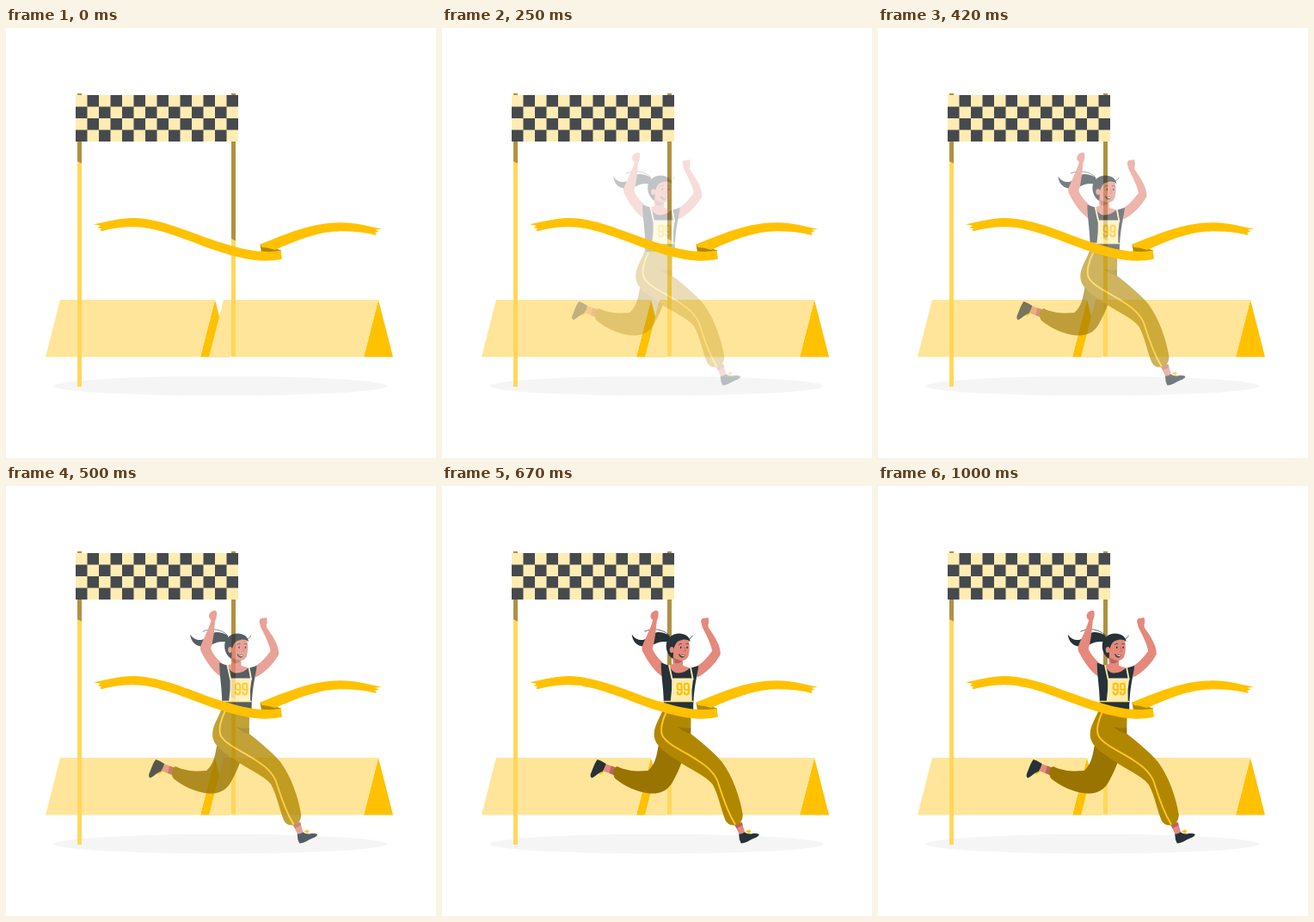
Animation of 500x500 px, one loop 1.04 s. Source, as an HTML page:

```html
<!DOCTYPE html>
<html lang="en">
<head>
<meta charset="utf-8">
<title>Finish line</title>
<style>
  html, body { margin: 0; width: 100%; height: 100%; overflow: hidden; background: #fff; }
  svg { display: block; width: 100%; height: 100%; }
  .gold { fill: #ffc100; }
  .pale { fill: #ffe599; }
  .cream { fill: #ffecb3; }
  .pole { fill: #ffd75c; }
  .poleShade { fill: #b09140; }
  .check { fill: #464a4f; }
  .ink { fill: #263238; }
  .skin { fill: #e4897b; }
  .skinShade { fill: #b8665c; }
  .pants { fill: #b28700; }
  .pantsBack { fill: #997400; }
  .line { fill: none; stroke-linecap: round; stroke-linejoin: round; }
</style>
</head>
<body>
<svg viewBox="0 0 500 500">
  <ellipse cx="249.5" cy="416.2" rx="193.9" ry="11.3" fill="#f5f5f5"/>

  <!-- barriers -->
  <path class="gold" d="M243 316L260 382.5H226Z"/>
  <path class="pale" d="M63 316H243L226 382.5H46Z"/>
  <path class="gold" d="M433 316L450 382.5H416Z"/>
  <path class="pale" d="M253 316H433L416 382.5H236Z"/>

  <!-- gate -->
  <path class="pole" d="M83 76H88V417H83ZM262 76H267V382H262Z"/>
  <path class="poleShade" d="M83 76H88V157.5L83 155ZM262 76H267V247.5L262 245Z"/>
  <rect class="cream" x="81" y="78" width="189" height="54"/>
  <path class="check" id="checks"/>

  <g id="runner" opacity="0">
    <!-- ponytail -->
    <path class="ink" d="M265 174C254 167 245 170 240 176C234 181 226 180 221 172.500C222 182 228 187 238 187C247 186 250 179 265 181.500Z"/>
    <path class="line" stroke="#263238" stroke-width=".7" d="M236 169C246 165 256 166 264 173"/>

    <!-- back leg -->
    <path class="skin" d="M190 323L203 327.500L200 336L187 331Z"/>
    <path class="skinShade" d="M197 325.500L203 327.500L200 336L195 334Z"/>
    <path class="gold" d="M183 333L189 330L188 333L184 335.500Z"/>
    <path class="ink" d="M181 318Q185 319 191 323Q189 329 187 332C182 333 179 338 174.500 339.500Q172 338 173.500 334C176 329 177 323 181 318Z"/>
    <path class="pantsBack" d="M204 326C216 332 229 332 240 331C249 323 250 312 252 302L284 304C281 318 275 333 268 345C261 356 252 358 242 357.500C228 356 212 349 202 340.500C198 336 199 328 204 326Z"/>

    <!-- front leg -->
    <path class="skin" d="M340 393L349 391L352.500 403L346 405Z"/>
    <path class="skinShade" d="M340 393L349 391L350 394.500L343 398Z"/>
    <path class="gold" d="M353 402L357 399.500L359.500 401L358 404Z"/>
    <path class="ink" d="M345.500 404.500Q349 405 352 402.500Q356 405.500 362 404Q367 403.500 369 405C369 408 363 409.500 359 411.500C355 414 351 415.500 348 415.500Q345.500 411 345.500 404.500Z"/>
    <path class="pants" d="M258 258H290L289.500 288C301 297 316 309 326 321C338 337 347 362 350 382C350 390 346 394 341 394.500Q333 395 330 389C325 377 322 360 315 347C306 336 289 330 274 319C261 311 248 302 247 291C246 279 254 270 258 258Z"/>
    <path class="pantsBack" d="M274 280Q284 283 289.500 281V288.500Q281 286 274 280Z"/>
    <path class="line" stroke="#ffc727" stroke-width="1.9" d="M261.500 262C257 271 253 284 257 291C264 302 283 309 299 320C310 327 319 335 322 347C327 363 333 380 341 393"/>

    <!-- arms -->
    <path class="skin" d="M245.500 156C242 168 236 178 233 187Q232 191 235 195C240 205 248 216 257 222L260 208C253 202 247 195 245 189C248 180 249 168 250 157C252 153 252.500 148 251.500 145.500Q249 143.500 245 146.500Q241.500 150 243.500 154Z"/>
    <path class="skin" d="M303 164C307 172 313 183 314.500 192C309 199 303 206 296 210L297 222.500C307 218 318 207 324 196C325 187 317 174 310 164.500Q309 161 310.500 159L310 153L303 154Q300.500 156 302 160Z"/>

    <!-- torso -->
    <path class="skin" d="M268 196L280 199L280.500 209L290 212L280 220H270L262 209L269 207Z"/>
    <path class="ink" d="M255 205.500L265 209Q268 218 275 217.500Q283 217 288 212L298.500 209C297 223 293 232 292.500 260H258C259 240 255 222 255 205.500Z"/>
    <path class="line" stroke="#ffecb3" stroke-width="1.8" d="M264.500 209L268 225M289.500 211.500L292 225" stroke-linecap="butt"/>
    <path class="cream" d="M267.500 223.500H292.500Q290 237 291 250.500H266Q268 237 267.500 223.500Z"/>
    <path class="line" stroke="#ffdc75" stroke-width="1.3" d="M258 250.500H292"/>
    <g class="line" stroke="#ffc100" stroke-width="2.2">
      <path id="nine" d="M279 237H276Q274 237 274 234.500V232Q274 229.700 276.500 229.700Q279 229.700 279 232V239.500Q279 242.300 276.500 242.300Q274 242.300 274 239.700"/>
      <use href="#nine" x="8.2"/>
    </g>

    <!-- head -->
    <path class="skinShade" d="M269.500 200L280 202.500Q278 207 271 206Z"/>
    <path class="skin" d="M266 182C268 175 283 173 287 179C288.500 184 288.500 191 287 197C285.500 202 281 204 276 202.500C271 201 268 197 267 193Z"/>
    <path class="ink" d="M261 186C261 177 268 171.500 276 171.500C283 171.500 288 175 289 181C285 177.500 281 178 276 180C272 182 271 186 269.500 190L269 201C264 198 261 192 261 186Z"/>
    <path class="line" stroke="#263238" stroke-width=".7" d="M286 178Q290 178 291.500 174"/>
    <ellipse class="skin" cx="267.500" cy="190.500" rx="2.500" ry="3.500"/>
    <ellipse class="ink" cx="278" cy="187.700" rx=".8" ry="1.200"/>
    <ellipse class="ink" cx="285.400" cy="187.700" rx=".8" ry="1.200"/>
    <path class="line" stroke="#263238" stroke-width=".7" d="M275.500 184.500Q277 182.500 279 183.500M284 183.500Q286 182.500 287 184"/>
    <path class="line" stroke="#b8665c" stroke-width=".7" d="M282 187L283.500 192L281.500 192.500"/>
    <path class="ink" d="M275.500 195Q279 197.500 283 196.500Q282 200 279 199.500Q276 198.500 275.500 195Z"/>
    <path fill="#fff" d="M276.500 195.700Q279 197.500 282.300 196.800L281.800 197.900Q278 198.200 276.500 195.700Z"/>
  </g>

  <!-- ribbon -->
  <path fill="#b28700" d="M295.500 251.500L320 258.500L318 262L297 261Z"/>
  <path class="gold" d="M102 228.300C119 225 131 221 148 221C185 221.500 224 243 260 252.500C279 258 299 262.500 319.500 258.500L321 268.500C299 273.500 278 269 256 262.500C219 252 183 231.500 148 231.300C135 231.300 123 233 111 236.300L109 234.500L111.500 233.300L106.500 232.300L110 230Z"/>
  <path class="gold" d="M295.500 251.500C327 239 356 226 390 226.200C407 226.200 421 230.500 437 233.700L429.500 234.700L433.500 236.500L429.500 237.700L430.500 241C417 237.500 404 236.300 390 236.300C363 236.300 338 247 313 258Q303 255 297.500 255Z"/>
</svg>
<script>
  const LOOP = 1040, STEP = 1000 / 24, STEPS = 25, SLIDE = 30;
  const runner = document.getElementById("runner");

  function checkerPath(x, y, size, cols, rows) {
    let d = "";
    for (let r = 0; r < rows; r++)
      for (let c = 0; c < cols; c++)
        if ((r + c) % 2) d += `M${x + c * size} ${y + r * size}h${size}v${size}h${-size}z`;
    return d;
  }

  function bezier(a, b, s) {
    const q = 1 - s;
    return 3 * a * s * q * q + 3 * b * s * s * q + s * s * s;
  }

  // Overshooting ease: cubic-bezier(.36, -.01, .5, 1.38)
  function ease(t) {
    let lo = 0, hi = 1;
    for (let i = 0; i < 24; i++) {
      const mid = (lo + hi) / 2;
      if (bezier(0.36, 0.5, mid) < t) lo = mid; else hi = mid;
    }
    return bezier(-0.01, 1.38, hi);
  }

  function draw(time) {
    // The motion ticks at 24 steps per second.
    const tick = Math.min(STEPS - 1, Math.floor((time % LOOP + 5) / STEP));
    const p = ease((tick + 1) / STEPS);
    const x = SLIDE * (p - 1) - 0.3;
    runner.setAttribute("transform", `translate(${x.toFixed(3)} 0)`);
    runner.setAttribute("opacity", tick < 2 ? 0 : Math.min(1, p).toFixed(4));
  }

  document.getElementById("checks").setAttribute("d", checkerPath(81, 78, 13.5, 14, 4));

  let start = null;
  function frame(now) {
    if (start === null) start = now;
    draw(Math.max(0, now - start));
    requestAnimationFrame(frame);
  }
  draw(0);
  requestAnimationFrame(frame);
</script>
</body>
</html>
```
